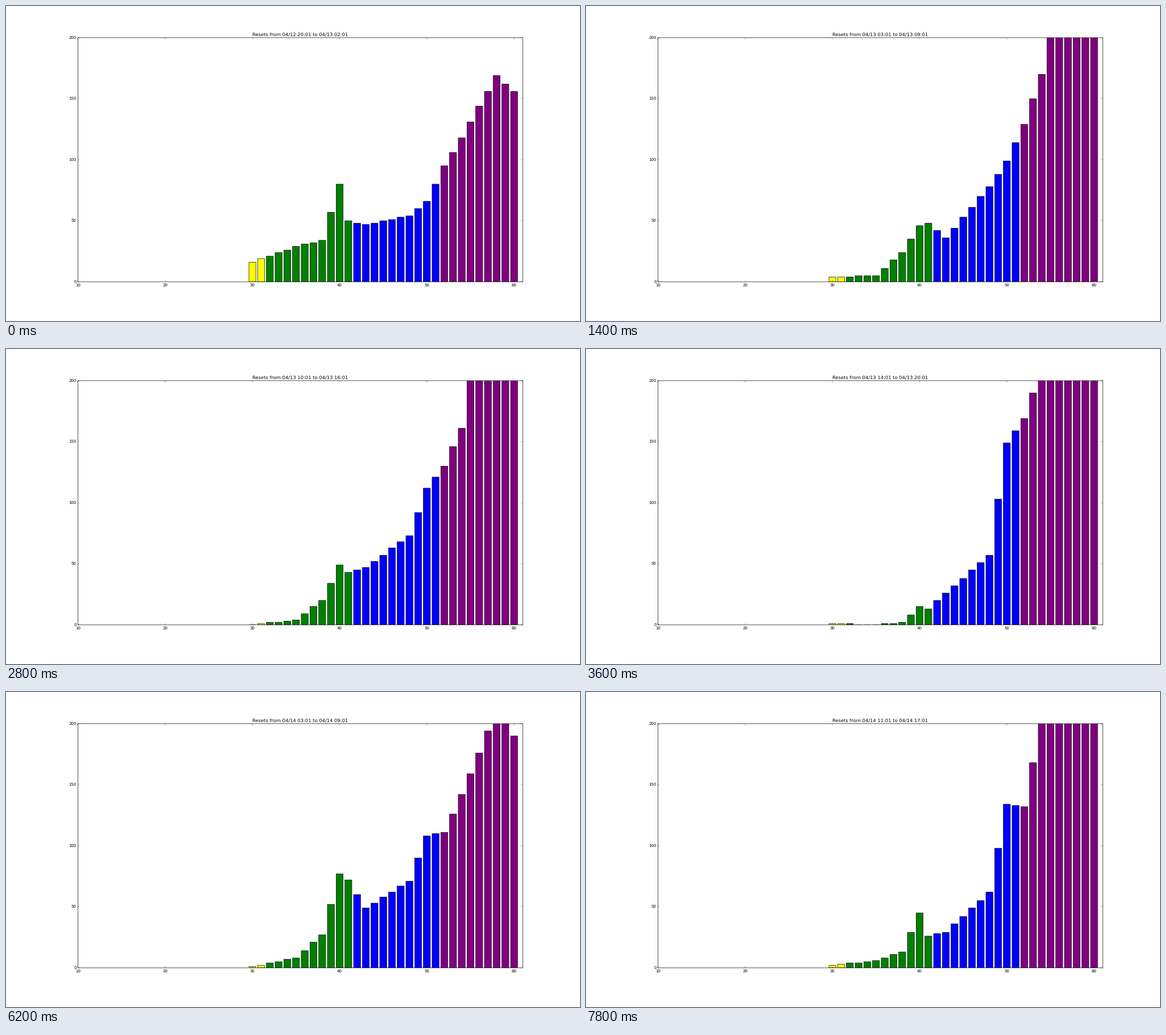
A matplotlib script for the animation above (8 s loop, 1009 by 555 pixels).

```python
import matplotlib.pyplot as plt
import numpy as np
from matplotlib.animation import FuncAnimation

WIDTH, HEIGHT, DPI = 1009, 555, 50.45
FRAMES, INTERVAL = 40, 200
START_DAY, START_HOUR, WINDOW = 12, 20, 6
NUDGE = 0.35  # pixels the axes sit right of and below the default margins

plt.style.use("classic")
plt.rcParams.update({
    "font.family": "DejaVu Sans",
    "font.size": 10,
    "text.hinting": "none",
    "path.snap": False,  # soft edges at fractional pixels
    "figure.facecolor": "white",
    "savefig.facecolor": "white",
    "savefig.dpi": "figure",
    "figure.subplot.left": 0.125 + NUDGE / WIDTH,
    "figure.subplot.right": 0.9 + NUDGE / WIDTH,
    "figure.subplot.bottom": 0.125 - NUDGE / HEIGHT,
    "figure.subplot.top": 0.9 - NUDGE / HEIGHT,
})

# The profile bends at a few seconds and drifts between a few hours.
# Counts over 200 run off the top.
BENDS = [30, 35, 38, 40, 41, 43, 48, 50, 52, 54, 58, 60]
PROFILES = {
    0: [16, 29, 34, 80, 50, 47, 54, 66, 95, 118, 169, 156],
    7: [4, 5, 24, 46, 48, 36, 78, 99, 129, 170, 290, 235],
    14: [0, 4, 20, 49, 43, 47, 73, 112, 130, 161, 320, 230],
    18: [1, 0, 2, 15, 13, 26, 57, 149, 169, 212, 275, 275],
    25: [0, 1, 4, 28, 38, 24, 64, 120, 147, 206, 265, 270],
    31: [1, 8, 27, 77, 72, 49, 71, 108, 111, 142, 211, 190],
    39: [2, 6, 13, 45, 26, 29, 62, 134, 132, 203, 235, 203],
}
HOURS = list(PROFILES)
SECONDS = np.arange(30, 61)


def color(second):
    for limit, name in ((32, "yellow"), (42, "green"), (52, "blue")):
        if second < limit:
            return name
    return "purple"


def counts(hour):
    bends = [np.interp(hour, HOURS, track) for track in zip(*PROFILES.values())]
    return np.round(np.interp(SECONDS, BENDS, bends))


def stamp(hour):
    days, hour = divmod(START_HOUR + hour, 24)
    return f"04/{START_DAY + days:02d} {hour:02d}:01"


fig = plt.figure(figsize=((WIDTH + 0.01) / DPI, (HEIGHT + 0.01) / DPI), dpi=DPI)
ax = fig.add_subplot()
bars = ax.bar(SECONDS, counts(0), width=0.8, align="center",
              color=[color(s) for s in SECONDS], edgecolor="black", linewidth=1)
ax.set_xlim(10, 61)
ax.set_ylim(0, 200)
ax.set_xticks(range(10, 61, 10))
ax.set_yticks(range(0, 201, 50))
title = ax.set_title("")


def update(hour):
    for bar, count in zip(bars, counts(hour)):
        bar.set_height(count)
    title.set_text(f"Resets from {stamp(hour)} to {stamp(hour + WINDOW)}")
    return [*bars, title]


anim = FuncAnimation(fig, update, frames=FRAMES, interval=INTERVAL,
                     repeat=True, blit=False)
plt.show()
```
